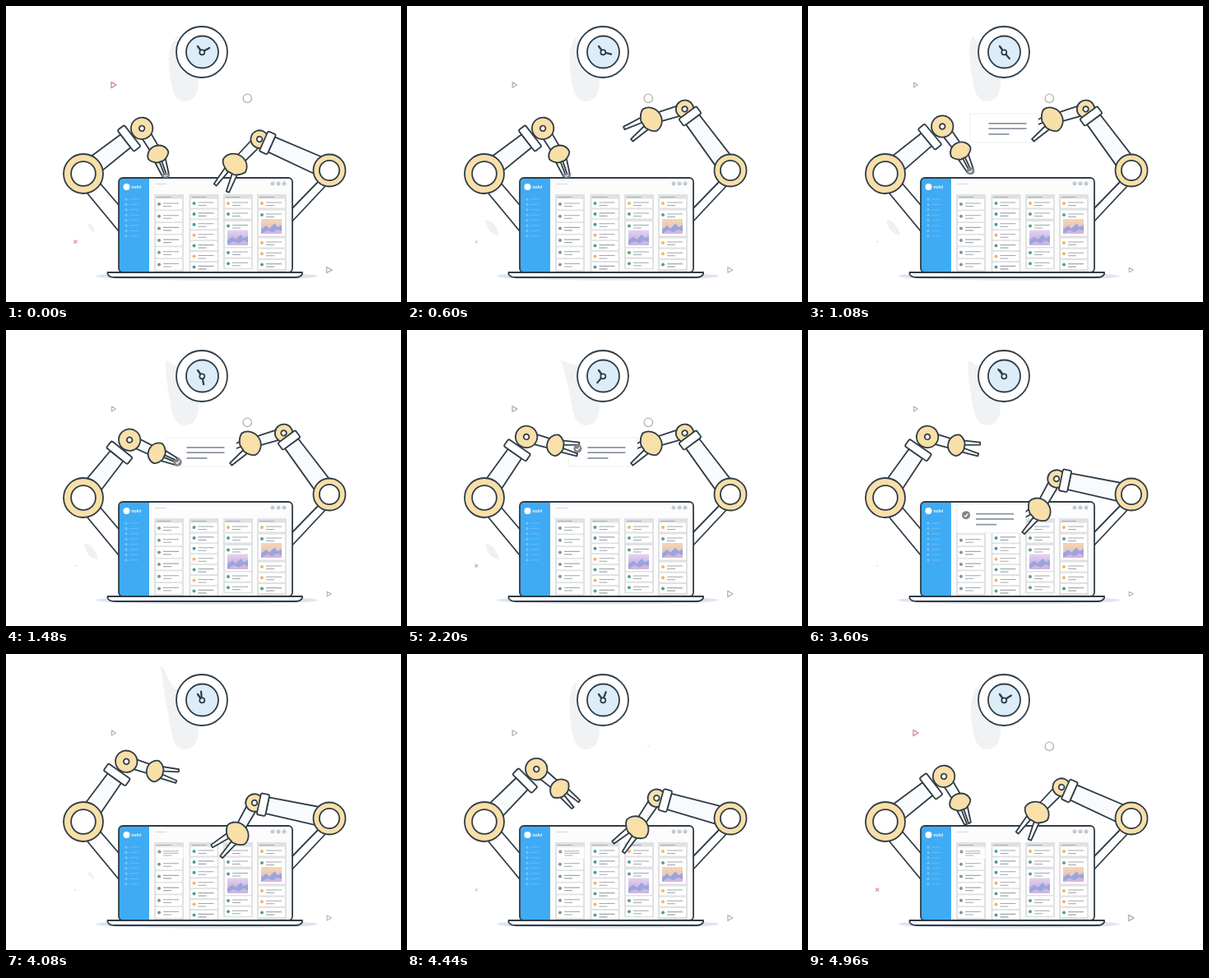
An HTML page for the animation above (5 s loop, 480x360 px).

```html
<!DOCTYPE html>
<html lang="en">
<head>
<meta charset="utf-8">
<title>Robot arms</title>
<style>
  html, body { margin: 0; width: 100%; height: 100%; overflow: hidden; background: #fff; }
  svg { display: block; width: 480px; height: 360px; }
  .ink { stroke: #2f3d48; stroke-width: 1.8; stroke-linejoin: round; stroke-linecap: round; fill: #fff; }
  .sand { fill: #f9dfa8; }
  .panel { fill: #f9fafb; }
  .none { fill: none; }
  .hand .ink, #backFinger .ink { vector-effect: non-scaling-stroke; }
  .deco { fill: none; stroke: #b3b8bb; stroke-width: 1.4; stroke-linejoin: round; }
  .deco.warm { stroke: #d99a9f; }
  .brand { font: 700 5.4px Lato, sans-serif; fill: #fff; }
  #minute { transform-origin: 238px 56px; }
</style>
</head>
<body>
<svg viewBox="0 0 480 360">
  <defs>
    <clipPath id="screen"><rect x="137" y="209" width="211" height="115" rx="5"/></clipPath>
    <linearGradient id="dusk" x2="0" y2="1">
      <stop offset="0" stop-color="#e6d3ee"/><stop offset="1" stop-color="#b9a3de"/>
    </linearGradient>
    <linearGradient id="dawn" x2="0" y2="1">
      <stop offset="0" stop-color="#f6d7ac"/><stop offset="1" stop-color="#d9b8dc"/>
    </linearGradient>
  </defs>

  <path id="blob" fill="#f1f2f3"/>
  <circle class="ink" cx="238" cy="56" r="31"/>
  <circle class="ink" cx="238.500" cy="56" r="19.500" style="fill:#dcedf9"/>
  <path class="ink none" d="M238 56L233 49" style="stroke-width:2.400"/>
  <path class="ink none" id="minute" d="M238 56V45.500" style="stroke-width:2.200"/>
  <circle class="ink" cx="238.300" cy="56.300" r="3"/>

  <path class="deco" id="triA" d="M-2.500-3.200L3 0L-2.500 3.200Z"/>
  <path class="deco" id="triB" d="M-2.800-3.500L3.500 0L-2.800 3.500Z"/>
  <circle class="deco" id="ring" r="5.200"/>
  <path class="deco" id="cross" d="M-2-2L2 2M2-2L-2 2"/>
  <path id="leaf" fill="#eff0f1" d="M-8-9Q4-8 8 9Q-5 8-8-9Z"/>

  <ellipse cx="244" cy="328.500" rx="135" ry="5" fill="#dfe5ee"/>
  <path class="ink" d="M113 214L142 248V280L99 228Z"/>
  <path class="ink" d="M380 213L344 250V266L388 219Z"/>

  <g clip-path="url(#screen)">
    <path fill="#fcfcfd" d="M137 209H348V324H137Z"/>
    <path fill="#3fabf5" d="M137 209H174V324H137Z"/>
    <circle cx="146.500" cy="220" r="4" fill="#fff"/>
    <text class="brand" x="152.500" y="222">nolvi</text>
    <g id="menu"></g>
    <path stroke="#d5d8da" d="M181 216.500H195"/>
    <g fill="#c6c9cb"><circle cx="324" cy="216" r="2.500"/><circle cx="331" cy="216" r="2.500"/><circle cx="338" cy="216" r="2.500"/></g>
    <g id="board"></g>
  </g>
  <rect class="ink none" x="137" y="209" width="211" height="115" rx="5"/>
  <path class="ink" d="M123.500 324H360V326Q358 330 352 330H132Q125 330 123.500 326Z"/>

  <g id="backFinger"></g>
  <g id="card">
    <rect width="83" height="35" rx="1" fill="#fff" stroke="#f1f2f3" stroke-width="1.300"/>
    <path stroke="#8b949e" stroke-width="1.800" d="M23 12H69M23 18.300H69M23 25H48"/>
  </g>
  <g id="right"></g>
  <g id="left"></g>
  <g id="check">
    <circle r="5" fill="#7f868b"/>
    <path fill="none" stroke="#fff" stroke-width="1.300" d="M-2.200 .2L-.6 1.800L2.300-1.600"/>
  </g>
</svg>
<script>
const LOOP = 5000, RAD = Math.PI / 180;
const $ = id => document.getElementById(id);
const place = (el, x, y, deg, sx = 1, sy = sx) =>
  el.setAttribute('transform', `translate(${x} ${y}) rotate(${deg}) scale(${sx} ${sy})`);
const mix = (a, b, k) => a + (b - a) * k;
const polar = (x, y, len, deg) => [x + len * Math.cos(deg * RAD), y + len * Math.sin(deg * RAD)];

// Eased 0 to 1 between two times, and a soft bump around one
const ramp = (t, from, to) => .5 - .5 * Math.cos(Math.PI * Math.min(1, Math.max(0, (t - from) / (to - from))));
const bump = (t, mid, half) => ramp(t, mid - half, mid) - ramp(t, mid, mid + half);

// Screen contents
let menu = '';
for (let y = 235; y < 281; y += 6.4)
  menu += `<circle cx="146" cy="${y}" r="1.500" fill="#7cc5fa"/><path stroke="#68bbf8" d="M150 ${y}H161"/>`;
$('menu').innerHTML = menu;

const TONES = { s: '#7f9499', g: '#55a08c', t: '#459a9d', o: '#f0b565' };

const row = (x, y, tone, h, full = h) =>
  `<rect x="${x + 2}" y="${y - h / 2}" width="32" height="${full}" rx=".8" fill="#fff"/>
  <circle cx="${x + 6}" cy="${y}" r="2" fill="${TONES[tone]}"/>
  <path stroke="#a0a7ad" stroke-width="1.100" d="M${x + 11} ${y - 1}h19M${x + 11} ${y + 2.5}h10"/>`;

const photoRow = (x, y, tone, sky) => row(x, y, tone, 11, 31) +
  `<g transform="translate(${x + 5} ${y + 5}) scale(25 18)"><path fill="url(#${sky})" d="M0 0H1V1H0Z"/>
  <path fill="#9aa5dc" d="M0 .7L.25 .45L.4 .65L.65 .3L.8 .55L1 .4V1H0Z"/>
  <path fill="#d6b4dc" d="M0 1L.3 .75L.55 .9L.8 .7L1 .85V1Z"/></g>`;

const column = (x, end = 324) =>
  `<path fill="#e0e1e2" d="M${x} 229h36V${end}h-36Z"/><path stroke="#a6abaf" stroke-width="1.200" d="M${x + 3} 232.500h18"/>`;
const stack = (x, y, gap, tones, h = 11) => [...tones].map((c, i) => row(x, y + i * gap, c, h)).join('');

$('board').innerHTML =
  column(180) + stack(180, 241, 14.7, 'ssssss', 13) +
  column(222.5) + stack(222.5, 240, 12.9, 'gttogog') +
  column(264, 320) + stack(264, 240, 13, 'og') + photoRow(264, 267.5, 'g', 'dusk') + stack(264, 300, 13.3, 'gg') +
  column(305) + stack(305, 240, 13, 'o') + photoRow(305, 254, 'g', 'dawn') + stack(305, 288, 13.3, 'oog');

// Arms: parts are drawn along +x and placed by angle
const DOME = 'M-11 0C-11-8-5-13 1-13Q6-11 9-4V4Q6 11 1 13C-5 13-11 8-11 0Z';

function makeArm(id, { x, y, rim, upper, clamp, reach, size }) {
  const circle = (cx, cy, r, cls = '') => `<circle class="ink ${cls}" cx="${cx}" cy="${cy}" r="${r}"/>`;
  const jaw = rim * .68;
  $(id).innerHTML = `
    <g class="fore"><path class="ink panel" d="M0-6.500L${reach}-5.500V5.500L0 6.500Z"/></g>
    <g class="upper">
      <path class="ink panel" d="M0-11.500L${clamp}-10V10L0 11.500Z"/>
      ${circle(upper, 0, rim * .55, 'sand')}${circle(upper, 0, 3.3)}
      <rect class="ink" x="${clamp}" y="${-jaw}" width="10.500" height="${2 * jaw}" rx="2"/>
    </g>
    ${circle(x, y, rim, 'sand')}${circle(x, y, rim * .62)}
    <g class="hand"><path class="ink finger"/><path class="ink finger"/><path class="ink sand" d="${DOME}"/></g>`;
  const find = name => $(id).querySelector(name);
  return {
    x, y, upper, reach, size,
    upperEl: find('.upper'), foreEl: find('.fore'), handEls: [find('.hand')],
    fingers: [...$(id).querySelectorAll('.finger')]
  };
}

const left = makeArm('left', { x: 94, y: 204, rim: 24, upper: 90, clamp: 65, reach: 37.5, size: 1 });
const right = makeArm('right', { x: 393, y: 200, rim: 19.5, upper: 93, clamp: 77, reach: 43.5, size: 1.2 });

// One finger of the right hand goes behind the card
$('backFinger').append(right.fingers[1]);
right.handEls.push($('backFinger'));

// Poses an arm and returns the centre of its hand
function pose(arm, [shoulder, elbow, wrist, gap]) {
  const [ex, ey] = polar(arm.x, arm.y, arm.upper, shoulder);
  const [hx, hy] = polar(ex, ey, arm.reach, elbow);
  place(arm.upperEl, arm.x, arm.y, shoulder);
  place(arm.foreEl, ex, ey, elbow);
  for (const el of arm.handEls) place(el, hx, hy, wrist, arm.size);
  arm.fingers.forEach((f, i) => {
    const k = i ? 1 : -1;
    f.setAttribute('d', `M6 ${k * 1.5}L27.500 ${k * (gap - 1.5)}L27 ${k * (gap + 1.5)}L6 ${k * 7}Z`);
  });
  return [hx, hy];
}

// Poses as shoulder, elbow and wrist angles, then finger gap
const blend = (a, b, k) => a.map((v, i) => mix(v, b[i], k));
const REST = [-37.8, 58.3, 70, 2.6], RAISED = [-55.4, 16, 10, 7];
const READY = [204.1, 134, 119.5, 7.3], HOLD = [233.4, 163, 147, 7.3], LOWER = [191.8, 119.5, 139, 7.3];

function draw(t) {
  const turn = 2 * Math.PI * t / LOOP;
  const beat = .5 + .5 * Math.cos(2 * turn);
  $('minute').style.transform = `rotate(${61 + 360 * t / LOOP}deg)`;

  // Shadow with a swaying tip
  const flick = bump(t, 4080, 450);
  const bx = 197 + 11 * Math.cos(turn) - 14 * flick;
  const by = 37 - 9 * bump(t, 2900, 500) - 23 * flick;
  $('blob').setAttribute('d', `M${bx} ${by}C${bx + 8} ${by + 2} 198 42 209 43L234 84Q236 116 217 116Q203 115 200 90Q193 52 ${bx} ${by}Z`);

  const warm = t < 400 || t > 4600;
  place($('triA'), 130.7, 96, 0, .9 + .2 * beat);
  place($('triB'), 392.5, 321, 0, .8 + .25 * beat);
  place($('cross'), 84.3, 286.8, 0, .3 + .7 * beat);
  $('triA').classList.toggle('warm', warm);
  $('cross').classList.toggle('warm', warm);
  place($('ring'), 293.3, 112.3, 0, 1 - ramp(t, 3000, 3400) + ramp(t, 4300, 4800));
  place($('leaf'), 103.5, 269.5, 0, mix(.6, 1.05, ramp(t, 0, 600)) * (1 - ramp(t, 3000, 3500)) + .45 * flick);

  const raise = ramp(t, 900, 1750) - ramp(t, 3950, 4850);
  const leftPose = blend(REST, RAISED, raise);
  leftPose[3] = mix(REST[3], RAISED[3], ramp(t, 1500, 1780) - ramp(t, 4200, 4850));
  const [lx, ly] = pose(left, leftPose);

  const held = blend(READY, HOLD, ramp(t, 60, 560));
  const lowered = blend(held, LOWER, ramp(t, 2840, 3560));
  const [rx, ry] = pose(right, blend(lowered, READY, ramp(t, 4200, 4860)));

  // The card hangs on the right hand, then shrinks into its slot
  const drop = ramp(t, 3620, 3960);
  const size = mix(1, .4, drop);
  const cx = mix(rx - 99.5, 182, drop), cy = mix(ry - 7.2, 235, drop);
  place($('card'), cx, cy, 0, size);
  $('card').style.opacity = ramp(t, 720, 1050);

  // The tick rides in the left hand until the card takes it
  const [px, py] = polar(lx, ly, 27, leftPose[2]);
  const join = ramp(t, 1600, 1850);
  const flat = mix(.6, 1, ramp(t, 900, 1200));
  place($('check'), mix(px, cx + 11 * size, join), mix(py, cy + 13.5 * size, join), 0, size, size * flat);
}

function loop() {
  draw(performance.now() % LOOP);
  requestAnimationFrame(loop);
}
loop();
</script>
</body>
</html>
```
